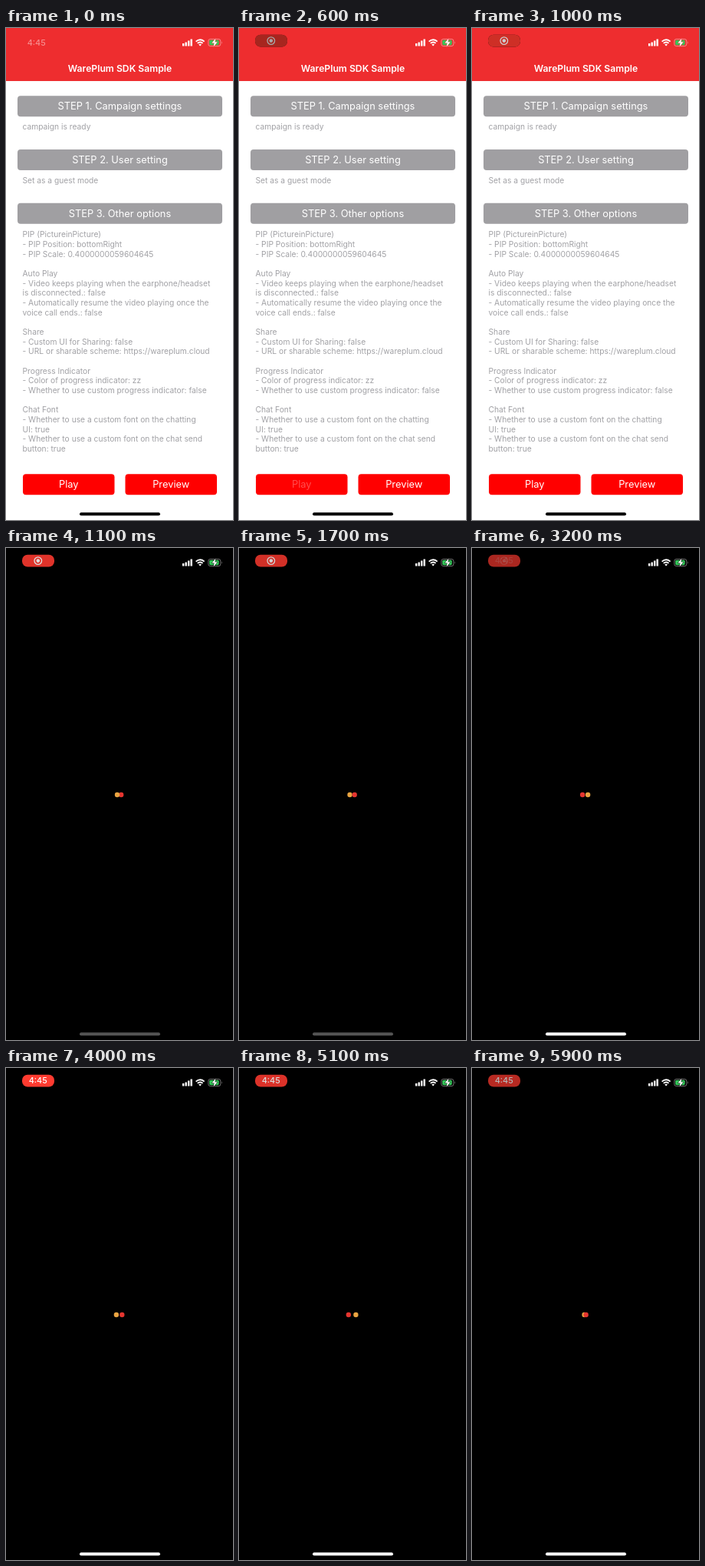
Write an HTML page that moves like this. It is 296 px wide and 640 px high and loops after 6000 ms.

```html
<!DOCTYPE html>
<html lang="en">
<head>
<meta charset="utf-8">
<title>SDK sample</title>
<style>
  html, body { margin: 0; width: 100%; height: 100%; overflow: hidden; background: #000; }
  svg { display: block; width: 296px; height: 640px; font-family: Inter, Roboto, sans-serif; }
  .note { font-size: 10.25px; fill: #a1a1a5; }
  .label { font-size: 12.85px; fill: #fff; text-anchor: middle; }
  .title { font-size: 12.2px; font-weight: 600; fill: #fff; text-anchor: middle; }
  .clock { font-size: 10.8px; font-weight: 500; fill: #fff; text-anchor: middle; }
</style>
</head>
<body>
<svg viewBox="0 0 296 640">
  <rect width="296" height="640"/>
  <g id="home">
    <rect width="296" height="640" fill="#fff"/>
    <rect width="296" height="69" fill="#ee2d2f"/>
    <text class="title" x="148.5" y="57">WarePlum SDK Sample</text>
    <g id="form"></g>
    <text id="time" class="clock" x="39.7" y="23">4:45</text>
  </g>
  <g id="loader">
    <circle id="amber" cy="321" r="3.2" fill="#e9a441"/>
    <circle id="red" cy="321" r="3.2" fill="#e5352f"/>
  </g>
  <g id="pill">
    <rect x="21" y="8.7" width="42" height="15.8" rx="7.2"/>
    <g id="glow">
      <rect x="21" y="8.7" width="42" height="15.8" rx="7.2" fill="#ff3b30"/>
      <g id="record" fill="none" stroke="#fff" stroke-width="1.3">
        <circle cx="41.8" cy="16.6" r="4.8"/>
        <circle cx="41.8" cy="16.6" r="2.3" fill="#fff" stroke="none"/>
      </g>
      <text id="pillTime" class="clock" x="41.7" y="20.4">4:45</text>
    </g>
  </g>
  <g fill="#fff">
    <path d="M230 20h2.4v3.5h-2.4zM233.5 18.4h2.4v5.1h-2.4zM237 16.6h2.4v6.9h-2.4zM240.5 14.6h2.4v8.9h-2.4z"/>
    <g fill="none" stroke="#fff" stroke-width="1.8">
      <path d="M247.6 17.6Q253.1 12.8 258.6 17.6M249.7 19.9Q253.1 17 256.5 19.9"/>
    </g>
    <path d="M251.2 21.4Q253.1 19.9 255 21.4L253.1 23.6Z"/>
    <rect x="263.8" y="14.4" width="16" height="9.2" rx="2.6" fill="none" stroke="#fff" stroke-opacity=".42"/>
    <path d="M281 17.3q1.5 1.7 0 3.4z" opacity=".45"/>
    <rect x="265.2" y="15.8" width="12.4" height="6.4" rx="1.4" fill="#34c759"/>
    <path id="bolt" d="M273.6 13.2L268.4 19.6H271.6L270.4 24.8L275.6 18.2H272.4Z" stroke-width="1" paint-order="stroke"/>
  </g>
  <rect id="bar" x="96" y="630.2" width="105" height="4" rx="2"/>
</svg>
<script>
const LOOP = 6000, STEP = 100, CUT = 1100;
const $ = id => document.getElementById(id);
const NS = "http://www.w3.org/2000/svg";

function add(tag, attrs, text = "") {
  const node = document.createElementNS(NS, tag);
  for (const key in attrs) node.setAttribute(key, attrs[key]);
  node.textContent = text;
  return $("form").appendChild(node);
}

function button(x, y, w, fill, text) {
  add("rect", { x, y, width: w, height: 27, rx: 4, fill });
  return add("text", { class: "label", x: x + w / 2, y: y + 18.1 }, text);
}

function note(y, text) {
  add("text", { class: "note", x: 21.5, y }, text);
}

["STEP 1. Campaign settings", "STEP 2. User setting", "STEP 3. Other options"]
  .forEach((text, i) => button(15, 88.2 + i * 69.8, 267, "#a09fa2", text));
note(132.4, "campaign is ready");
note(202.4, "Set as a guest mode");

`PIP (PictureinPicture)
- PIP Position: bottomRight
- PIP Scale: 0.4000000059604645

Auto Play
- Video keeps playing when the earphone/headset
is disconnected.: false
- Automatically resume the video playing once the
voice call ends.: false

Share
- Custom UI for Sharing: false
- URL or sharable scheme: https://wareplum.cloud

Progress Indicator
- Color of progress indicator: zz
- Whether to use custom progress indicator: false

Chat Font
- Whether to use a custom font on the chatting
UI: true
- Whether to use a custom font on the chat send
button: true`.split("\n").forEach((line, i) => note(272.3 + i * 12.66, line));

const play = button(22, 580.2, 119.5, "#ff0000", "Play");
button(155.5, 580.2, 119.5, "#ff0000", "Preview");

// Tracks are [time, value] pairs.
const linear = p => p;
const sine = p => (1 - Math.cos(p * Math.PI)) / 2;
const tracks = {
  glow: [[-200, 1], [650, .65], [1400, 1], [2000, .65], [2600, 1], [3300, .65], [4000, 1], [4700, .65], [5400, 1], [6100, .65]],
  time: [[0, .45], [200, 0]],
  pill: [[100, 0], [400, 1]],
  record: [[3000, 1], [3250, 0]],
  pillTime: [[3150, 0], [3400, 1]],
  press: [[300, 1], [400, .3], [600, .3], [800, 1]],
  bar: [[2100, .33], [2900, 1]]
};

function at(track, t, ease = linear) {
  const i = track.findIndex(k => k[0] > t);
  if (i === 0) return track[0][1];
  if (i < 0) return track[track.length - 1][1];
  const [t0, a] = track[i - 1], [t1, b] = track[i];
  return a + (b - a) * ease((t - t0) / (t1 - t0));
}

const fade = (node, value) => node.setAttribute("opacity", value);

function draw(t) {
  const loading = t >= CUT;
  $("home").style.display = loading ? "none" : "";
  $("loader").style.display = loading ? "" : "none";
  $("bolt").setAttribute("stroke", loading ? "#000" : "#ee2d2f");

  fade($("glow"), at(tracks.glow, t, sine));
  for (const id of ["time", "pill", "record", "pillTime"]) fade($(id), at(tracks[id], t));
  fade(play, at(tracks.press, t));

  const level = Math.round(255 * at(tracks.bar, t));
  $("bar").setAttribute("fill", loading ? `rgb(${level},${level},${level})` : "#000");

  // The dots circle each other, seen from the side.
  const angle = (175 + (t - 5100) * .778) * Math.PI / 180;
  const shift = 4.8 * Math.cos(angle);
  $("red").setAttribute("cx", 147.6 + shift);
  $("amber").setAttribute("cx", 147.6 - shift);
  const front = $(Math.sin(angle) > 0 ? "red" : "amber");
  if ($("loader").lastElementChild !== front) $("loader").append(front);
}

const start = performance.now();
function tick() {
  const t = (performance.now() - start) % LOOP;
  draw(Math.floor(t / STEP) * STEP);
  requestAnimationFrame(tick);
}
tick();
</script>
</body>
</html>
```
